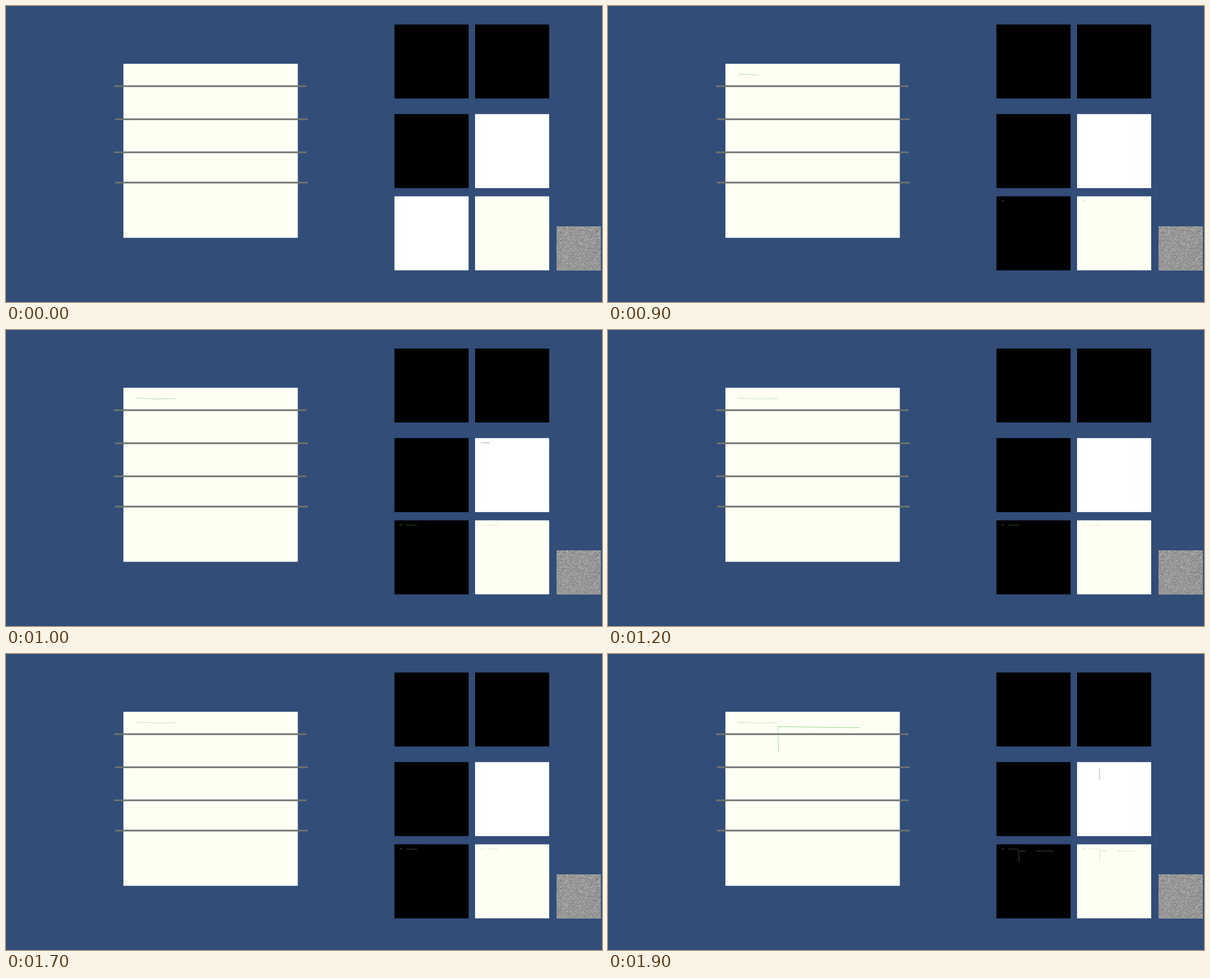
Recreate the animation shown at these times as an HTML page with a canvas. Size 1061 by 528 pixels, loop 2000 ms.

```html
<!DOCTYPE html>
<html lang="en">
<head>
<meta charset="utf-8">
<title>Sketch board</title>
<style>
  html, body { margin: 0; width: 100%; height: 100%; overflow: hidden; background: #314d78; }
  canvas { display: block; }
</style>
</head>
<body>
<canvas id="stage" width="1061" height="528"></canvas>
<script>
const ctx = document.getElementById('stage').getContext('2d');
const LOOP = 2000, CREAM = '#fffff4', GREEN = '#a9dda5', PALE = '#bfe3c4';

function rect(color, x, y, w, h) {
  ctx.fillStyle = color;
  ctx.fillRect(x, y, w, h);
}

function line(color, ...points) {
  ctx.strokeStyle = color;
  ctx.lineWidth = 1;
  ctx.beginPath();
  points.forEach(([x, y]) => ctx.lineTo(x + 0.5, y + 0.5));
  ctx.stroke();
}

function makeNoise(size) {
  const tile = document.createElement('canvas');
  tile.width = tile.height = size;
  const g = tile.getContext('2d');
  let seed = 7;
  for (let y = 0; y < size; y++) {
    for (let x = 0; x < size; x++) {
      seed = (seed * 16807) % 2147483647;
      const v = Math.round(118 + 66 * seed / 2147483647);
      g.fillStyle = `rgb(${v},${v},${v})`;
      g.fillRect(x, y, 1, 1);
    }
  }
  return tile;
}
const noise = makeNoise(79);

function rod(x, y) {
  rect('#6d736e', x, y, 343, 3);
  rect('#8b8672', x + 4, y + 1, 2, 1);
  rect('#8b8672', x + 340, y + 1, 2, 1);
}

function drawPage(t) {
  rect(CREAM, 209, 103, 310.5, 310.5);
  if (t >= 800) rect('#a8bda5', 232, 121, 1, 1);
  if (t >= 900) line(t < 1100 ? GREEN : PALE, [232, 121], [268, 122.5]);
  if (t >= 1000) line(t < 1100 ? GREEN : PALE, [268, 122.5], [301, 122]);
  if (t >= 1700) rect('#a8bda5', 303, 174, 1, 1);
  if (t >= 1800) {
    line(GREEN, [303, 175], [302, 129]);
    rect('#7fae7e', 303, 174, 1, 1);
  }
  if (t >= 1900) line('#8fd68a', [302, 129], [447, 131]);
}

// Coordinates are relative to a small panel.
function drawTraces(x, y, color, t) {
  const trace = (...points) => line(color, ...points.map(([a, b]) => [x + a, y + b]));
  if (t >= 900) trace([9, 8], [14, 8]);
  if (t >= 1000) trace([21, 8.5], [40, 8.5]);
  if (t >= 1700 && t < 1800) trace([40, 30], [41, 30]);
  if (t >= 1800) trace([40, 31], [39.5, 12]);
  if (t >= 1900) {
    trace([39, 12], [52, 12]);
    trace([71, 12], [101, 12]);
  }
}

function drawPanels(t) {
  const panel = (color, x, y) => rect(color, x, y, 132, 132);
  panel('#000', 691.5, 33);
  panel('#000', 835, 33);
  panel('#000', 691.5, 192.8);
  panel('#fff', 835, 192.8);
  panel(t < 800 ? '#fff' : '#000', 691.5, 339.5);
  panel(CREAM, 835, 339.5);

  // The white panel shows the stroke of the previous step.
  if (t >= 1000 && t < 1100) line('#a5a5a5', [845, 200], [851, 201], [860, 201]);
  if (t >= 1100 && t < 1200) line('#a5a5a5', [860, 201], [874, 201]);
  if (t >= 1900) line('#a0a0a0', [874, 204], [875, 223]);

  drawTraces(691, 339, '#36513a', t);
  drawTraces(835, 339, '#d3e6cd', t);
}

function frame(now) {
  const t = now % LOOP;
  rect('#314d78', 0, 0, 1061, 528);
  drawPage(t);
  rod(192, 141.5);
  rod(194, 200.5);
  rod(192, 259.5);
  rod(194, 313.5);
  drawPanels(t);
  ctx.drawImage(noise, 979.5, 393);
  requestAnimationFrame(frame);
}
requestAnimationFrame(frame);
</script>
</body>
</html>
```
